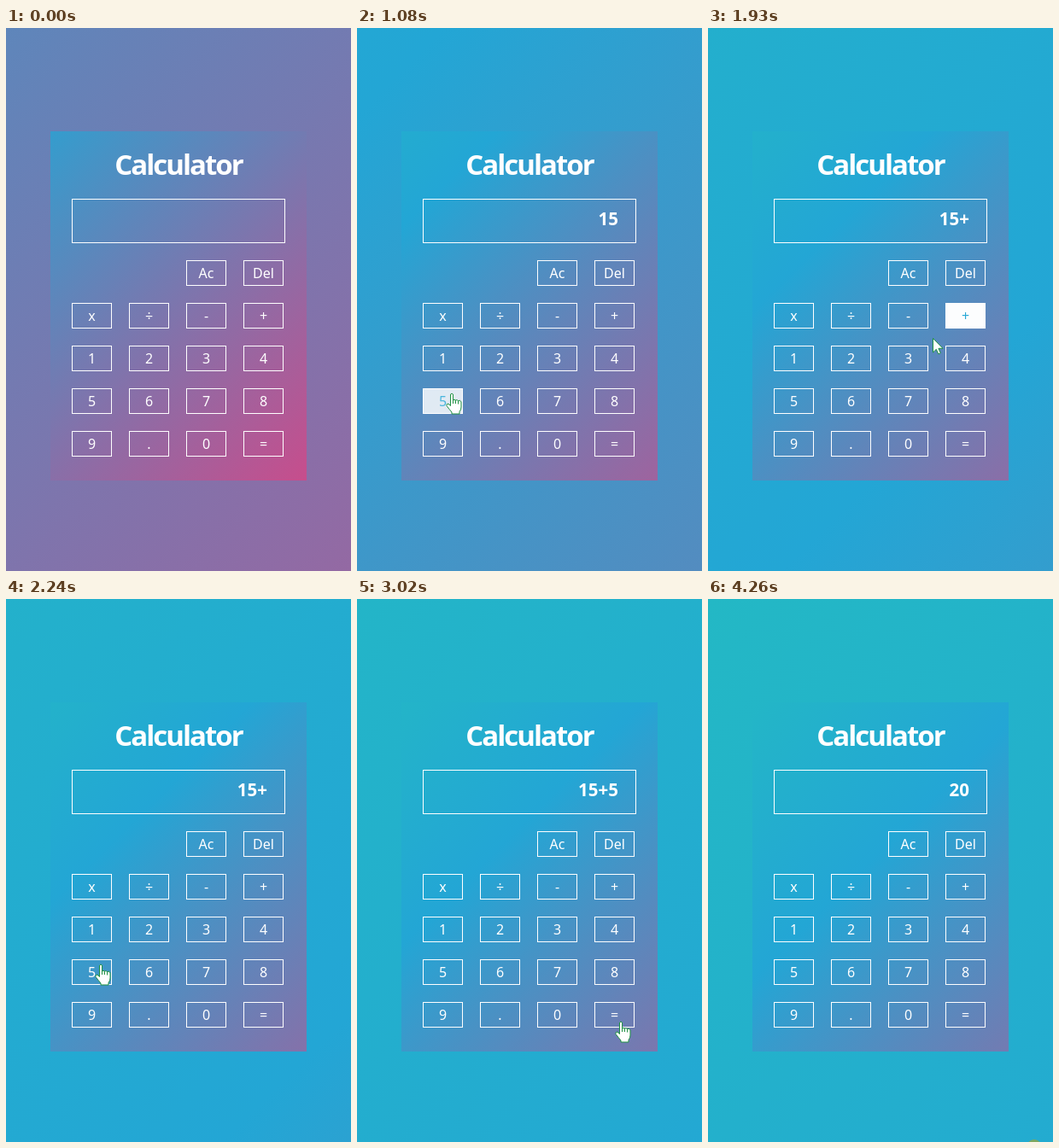
An HTML page that plays this animation: 404x636 px, repeating every 4340 ms.

```html
<!DOCTYPE html>
<html lang="en">
<head>
<meta charset="utf-8">
<title>Calculator</title>
<style>
  html, body { margin: 0; width: 100%; height: 100%; overflow: hidden; }
  body { position: relative; color: #fff; font-family: "Noto Sans", "Open Sans", sans-serif; }
  div, svg { position: absolute; box-sizing: border-box; }
  #stage { left: 0; top: 0; width: 404px; height: 636px; overflow: hidden; }
  .flow {
    background: linear-gradient(-45deg, #ee7752, #e73c7e, #23a6d5, #23d5ab);
    background-size: 400% 400%;
    background-position: var(--pan, 46%) 50%;
  }
  /* The wide page, of which the stage shows a part */
  #page { left: -758px; top: -143px; width: 1920px; height: 937px; }
  #panel { left: 52px; top: 121px; width: 300px; height: 409px; }
  #title {
    left: 52px; top: 140px; width: 300px; text-align: center;
    font-size: 33px; font-weight: 700; line-height: 40px; letter-spacing: -2px;
  }
  #display {
    left: 77px; top: 200px; width: 250px; height: 52px; padding-right: 20px;
    border: 1px solid #fff; text-align: right; font-size: 20.5px; font-weight: 700; line-height: 44px;
  }
  .key {
    --on: 0%;
    width: 47px; height: 30px; border: 1px solid #fff;
    text-align: center; font-size: 16px; font-weight: 500; line-height: 28px;
    background: color-mix(in srgb, #fff var(--on), transparent);
    color: color-mix(in srgb, #23a6d5 var(--on), #fff);
  }
  #pointer { left: 0; top: 0; overflow: visible; fill: #fff; stroke: #1f9143; stroke-linejoin: round; }
  #dot { left: 373px; top: 633px; width: 18px; height: 18px; border-radius: 50%; background: #7fa860; }
</style>
</head>
<body>
<div id="stage">
  <div id="page" class="flow"></div>
  <div id="panel" class="flow"></div>
  <div id="title">Calculator</div>
  <div id="display"></div>
  <div id="keys"></div>
  <div id="dot"></div>
  <svg id="pointer" width="24" height="28">
    <path id="arrow" d="M.5 .5V17L4.300 13.300L6.800 18.800L9.300 17.700L6.900 12.300H12Z"/>
    <g id="hand" transform="translate(1 0)">
      <path d="M-1.500 1Q0-.8 1.500 1V8Q3 6.300 4.500 8Q6 6.800 7.500 8.700Q9.500 7.300 11 9.700V16Q11 19 9 21.500V24H0V22Q-3 18.500-6 14.500Q-6.500 12-4 12L-1.500 14.500Z"/>
      <path fill="none" d="M1.500 8V12M4.500 8V12M7.500 8.700V12.500"/>
    </g>
  </svg>
</div>
<script>
  const LOOP = 4340, PHASE = 2350, HALF = 7500;
  const LAG = 100, FADE = 50;
  const $ = id => document.getElementById(id);
  const clamp = v => Math.min(1, Math.max(0, v));
  const smooth = u => u * u * (3 - 2 * u);

  const rows = [["", "", "Ac", "Del"], [..."x÷-+"], [..."1234"], [..."5678"], [..."9.0="]];
  const keys = {};
  rows.forEach((row, r) => row.forEach((label, c) => {
    if (!label) return;
    const el = document.createElement("div"), x = 77 + 67 * c, y = 272 + 50 * r;
    el.className = "key";
    el.textContent = label;
    el.style.left = x + "px";
    el.style.top = y + "px";
    $("keys").append(el);
    keys[label] = { el, x, y };
  }));

  // The pointer rests on a key from "from" to "to", at an offset inside it
  const visit = (label, from, to, dx, dy) =>
    ({ label, from, to, x: keys[label].x + dx, y: keys[label].y + dy });
  const visits = [
    visit("1", 430, 820, 29, 8),
    visit("5", 940, 1110, 33, 6),
    visit("+", 1550, 1830, 24, 25),
    visit("5", 2180, 2400, 33, 6),
    visit("=", 2945, 3650, 30, 23)
  ];
  const stops = [
    { from: 70, to: 70, x: 268, y: 500 },
    ...visits,
    { from: 3950, to: 3950, x: 360, y: 650 }
  ];

  const bezier = (a, b, u) => 3 * a * u * (1 - u) ** 2 + 3 * b * u * u * (1 - u) + u ** 3;

  // CSS "ease": cubic-bezier(.25, .1, .25, 1)
  function ease(x) {
    let lo = 0, hi = 1;
    for (let i = 0; i < 24; i++) {
      const mid = (lo + hi) / 2;
      if (bezier(0.25, 0.25, mid) < x) lo = mid; else hi = mid;
    }
    return bezier(0.1, 1, lo);
  }

  function tipAt(t) {
    const i = stops.findIndex(s => s.from > t);
    if (i < 1) return null;
    const a = stops[i - 1], b = stops[i];
    const k = smooth(clamp((t - a.to) / (b.from - a.to)));
    return { x: a.x + (b.x - a.x) * k, y: a.y + (b.y - a.y) * k };
  }

  // Each visit presses its key halfway through
  function reading(t) {
    return visits.filter(v => (v.from + v.to) / 2 <= t).reduce((text, { label }) =>
      label === "=" ? String(text.split("+").reduce((sum, n) => sum + Number(n), 0)) : text + label, "");
  }

  // Highlights follow the pointer with a short delay
  const glow = (label, t) => visits.filter(v => v.label === label).reduce((sum, v) =>
    sum + clamp((t - v.from - LAG) / FADE) - clamp((t - v.to - LAG) / FADE), 0);

  const inside = (key, tip) => tip.x >= key.x && tip.x < key.x + 47 &&
    tip.y >= key.y && tip.y < key.y + 30;

  function draw(t) {
    const pan = 1 - ease((PHASE + t) / HALF);
    $("stage").style.setProperty("--pan", pan * 100 + "%");
    $("display").textContent = reading(t);

    for (const label in keys) {
      keys[label].el.style.setProperty("--on", glow(label, t) * 100 + "%");
    }

    const tip = tipAt(t);
    $("pointer").style.display = tip ? "" : "none";
    if (tip) {
      const over = Object.values(keys).some(key => inside(key, tip));
      $("pointer").style.transform = `translate(${Math.round(tip.x)}px, ${Math.round(tip.y)}px)`;
      $("hand").style.display = over ? "" : "none";
      $("arrow").style.display = over ? "none" : "";
    }
    $("dot").style.display = t >= 4180 ? "" : "none";
  }

  const start = performance.now();
  function tick() {
    draw((performance.now() - start) % LOOP);
    requestAnimationFrame(tick);
  }
  tick();
</script>
</body>
</html>
```
